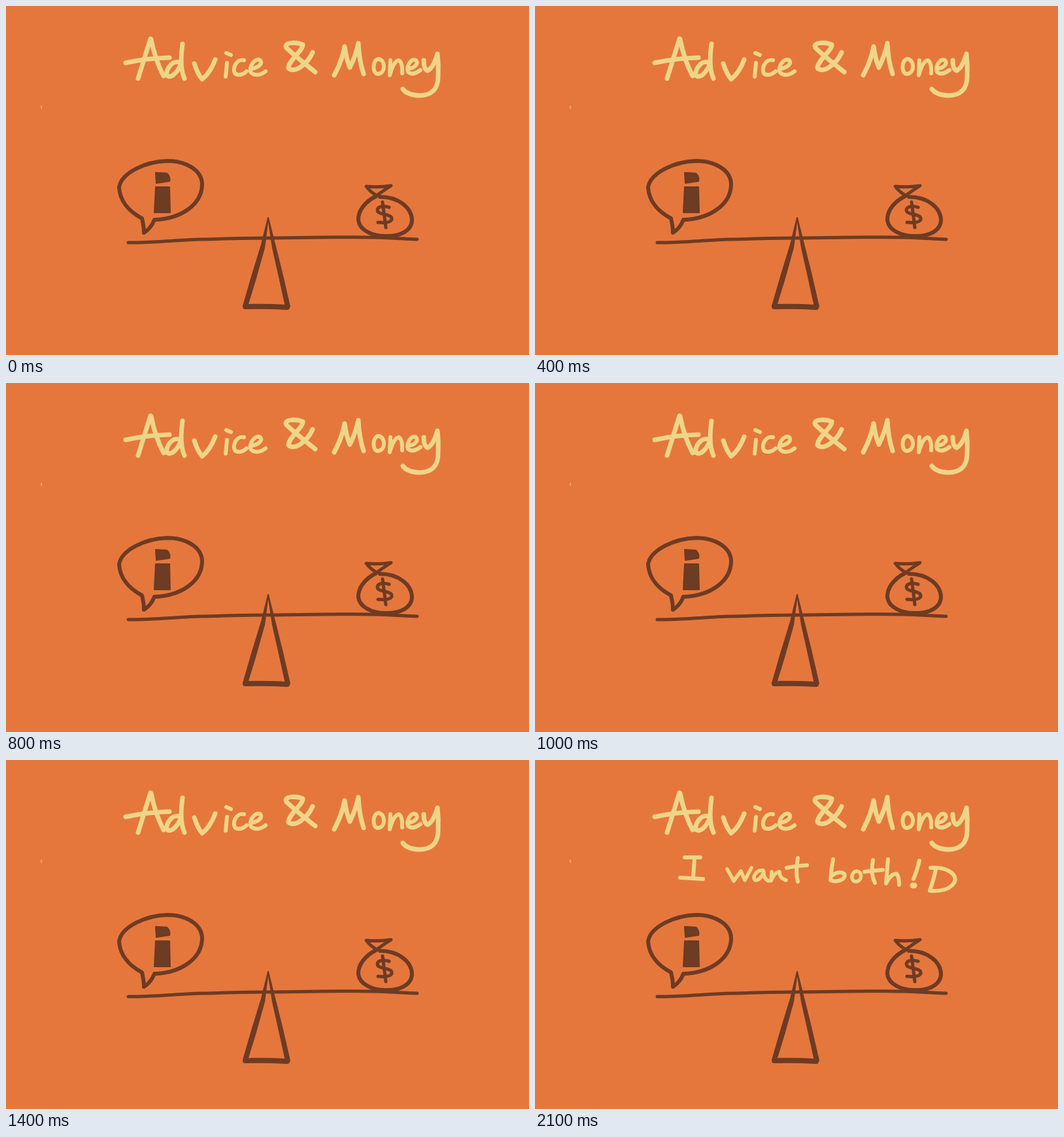
Animation of 800x534 px, one loop 2600 ms. Source, as an HTML page:

```html
<!DOCTYPE html>
<html lang="en">
<head>
<meta charset="utf-8">
<title>Advice &amp; Money</title>
<style>
  html, body { margin: 0; width: 100%; height: 100%; overflow: hidden; background: #e5773d; }
  svg { display: block; width: 100%; height: 100%; }
  path { fill: none; stroke-linecap: round; stroke-linejoin: round; }
  .chalk path { stroke: #eed587; }
  .ink path { stroke: #6e3b23; }
  .ink .solid { fill: #6e3b23; stroke-width: 2; }
</style>
</head>
<body>
<svg viewBox="0 0 800 534">
  <g class="chalk" stroke-width="7" role="img" aria-label="Advice &amp; Money">
    <!-- Advice -->
    <path d="M221 50Q211 82 202 111M222 51Q228 82 241 107M183 87Q214 80 250 79" />
    <path d="M264 86C253 83 242 101 247 107C254 111 264 99 268 87M270 58Q265 94 273 111" />
    <path d="M288 88Q293 104 300 112Q312 103 320 82" />
    <path d="M338 87L336 108M337 72L344 75" stroke-width="6" />
    <path d="M364 83C352 80 345 97 351 104Q359 108 368 100" stroke-width="6" />
    <path d="M374 96C385 95 393 89 389 83C381 78 370 94 375 102C381 108 391 105 397 100" stroke-width="6" />
    <!-- & -->
    <path d="M473 101C458 89 440 75 429 64C424 55 444 55 454 59C455 68 432 83 432 95C441 104 461 89 469 71" />
    <!-- Money -->
    <path d="M502 106Q514 84 518 62Q521 83 526 94Q535 76 539 57Q540 83 547 104" />
    <path d="M570 81C560 82 560 104 569 104C581 103 581 83 570 81" stroke-width="6" />
    <path d="M588 83L587 106Q593 84 601 83Q607 87 606 103" stroke-width="6" />
    <path d="M615 96C626 95 632 87 627 83C619 79 612 93 615 101Q622 107 634 98" stroke-width="6" />
    <path d="M639 83Q639 97 645 99Q654 94 660 73Q662 90 661 108C661 128 650 137 632 137Q613 136 607 127" />
  </g>
  <g class="chalk"><path d="M54 153V157" stroke-width="1" /></g>

  <g id="wish" class="chalk" stroke-width="6" role="img" aria-label="I want both!">
    <path d="M229 149L253 149M244 150L242 180M222 180L257 182" />
    <path d="M294 167L304 185L315 170L321 184L331 165" stroke-width="5.5" />
    <path d="M349 169C339 167 331 180 337 184Q345 184 350 171Q349 181 357 185" stroke-width="5.5" />
    <path d="M362 171L361 185Q367 171 374 171Q374 181 384 184" stroke-width="5.5" />
    <path d="M385 165Q399 162 416 161M402 150Q398 173 402 186" />
    <path d="M456 152Q453 168 452 184C463 188 477 182 473 174Q465 169 454 177" />
    <path d="M492 170C482 172 483 186 491 186C501 185 501 171 492 170" stroke-width="5.5" />
    <path d="M504 171L532 168M517 153Q513 175 520 188" />
    <path d="M540 152L537 189Q544 174 553 174Q557 178 557 191" />
    <path d="M588 154Q584 170 579 182" />
    <path d="M578 192L580 192" stroke-width="9" />
  </g>
  <g id="grin" class="chalk" stroke-width="6" role="img" aria-label="D">
    <path d="M613 168Q609 186 604 199M605 165C631 163 648 176 641 188C634 199 619 201 604 200" />
  </g>

  <g class="ink">
    <path class="solid" d="M401 324L391 365L376 414L363 459L369 459L381 420L395 370Z" />
    <path class="solid" d="M401 324L408 370L417 410L428 460L434 460L422 408L412 368Z" />
    <path d="M366 460Q398 459 430 461" stroke-width="8" />
  </g>

  <g id="beam" class="ink">
    <path d="M187 362C230 362 260 358 300 357S370 355 400 355S520 353 560 354S600 356 629 357" stroke-width="5" />
  </g>
  <g id="bubble" class="ink">
    <path d="M229 327C268 325 300 304 300 272C299 249 272 237 247 237C213 238 177 255 173 277C174 299 189 315 208 325Q211 337 211 347Q222 340 227 327" stroke-width="6" />
    <path class="solid" d="M229 255L246 256Q252 262 250 268L230 271Z" />
    <path class="solid" d="M229 277L250 277L251 316L227 316Z" />
  </g>
  <g id="bag" class="ink">
    <path d="M566 291C550 299 538 313 539 328C541 343 560 352 580 352C604 353 621 343 621 327C620 308 600 292 572 292" stroke-width="6" />
    <path d="M551 276Q570 278 589 275Q575 284 567 290Q558 285 551 276Z" stroke-width="5" />
    <path d="M586 308C576 305 565 307 569 315C574 320 592 318 590 327C587 332 578 332 569 331M576 300L581 339" stroke-width="5" />
  </g>
</svg>
<script>
  const LOOP = 2600, STEP = 100;
  const part = id => document.getElementById(id);
  const [beam, bubble, bag, wish, grin] = ['beam', 'bubble', 'bag', 'wish', 'grin'].map(part);

  // Every other step is level; the third tip throws the bag off.
  const level = { angle: 0 };
  const tips = [
    { angle: -15 },
    { angle: 15 },
    { angle: -17.2, bubble: [-40, 12], bag: [41, -150] }
  ];

  function poseAt(time) {
    const step = Math.floor(time / STEP);
    return step < 16 && step % 2 ? tips[(step - 1) / 2 % 3] : level;
  }

  function place(element, angle, [x, y] = [0, 0]) {
    element.setAttribute('transform', `translate(${x} ${y}) rotate(${angle} 402 355)`);
  }

  function draw() {
    const time = performance.now() % LOOP;
    const pose = poseAt(time);
    place(beam, pose.angle);
    place(bubble, pose.angle, pose.bubble);
    place(bag, pose.angle, pose.bag);
    wish.style.display = time >= 1600 ? '' : 'none';
    grin.style.display = time >= 2100 ? '' : 'none';
    requestAnimationFrame(draw);
  }
  draw();
</script>
</body>
</html>
```
